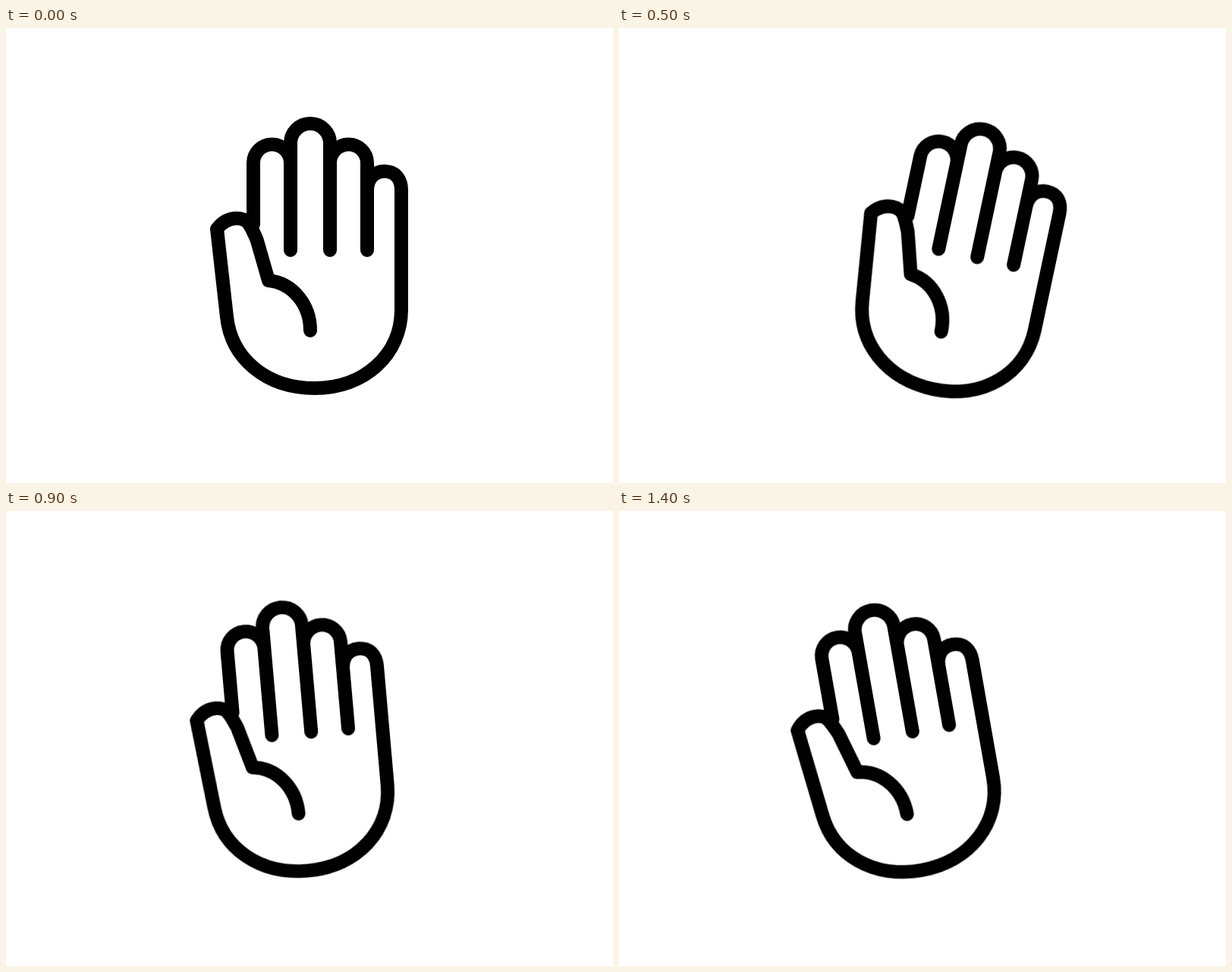
These frames come from a looping animation (800x600 px, 1.5 s). An HTML page:

```html
<!DOCTYPE html>
<html lang="en">
<head>
<meta charset="utf-8">
<title>Waving hand</title>
<style>
  html, body { margin: 0; width: 100%; height: 100%; overflow: hidden; background: #fff; }
  svg { display: block; width: 100%; height: 100%; }
  #hand {
    fill: none;
    stroke: #000;
    stroke-width: 18;
    stroke-linecap: round;
    stroke-linejoin: round;
    transform-origin: 400px 467px;
  }
</style>
</head>
<body>
<svg viewBox="0 0 800 600">
  <g id="hand">
    <!-- index, middle and ring fingers -->
    <path d="M326 259V178a24.5 24.5 0 0 1 49 0"/>
    <path d="M375 293V152a26 26 0 0 1 52 0V293"/>
    <path d="M427 178a24.5 24.5 0 0 1 49 0V293"/>
    <!-- little finger, palm and thumb -->
    <path d="M476 214C476 199 485 189 499 189C513 189 521 199 521 214V371
             C521 431 472 475 407 475C343 475 297 436 291 381L278 265
             C285 256 294 251 304 251C318 251 321 257 330.5 279L346 333
             C377 336 401 364 401 399"/>
  </g>
</svg>
<script>
  const STEP = 100, COUNT = 15, SHIFT = 9.5;
  const swing = [0, 5, 10, 12, 13, 12, 10, 5];

  // The second half of the wave mirrors the first.
  function pose(i) {
    const side = i < swing.length ? 1 : -1;
    const angle = side * swing[i % swing.length];
    return `translateX(${Math.sign(angle) * SHIFT}px) rotate(${angle}deg)`;
  }

  const frames = Array.from({ length: COUNT }, (_, i) => ({
    offset: i / COUNT, transform: pose(i), easing: 'step-end'
  }));
  frames.push({ offset: 1, transform: pose(COUNT - 1) });

  document.getElementById('hand').animate(frames, {
    duration: STEP * COUNT, iterations: Infinity
  });
</script>
</body>
</html>
```
